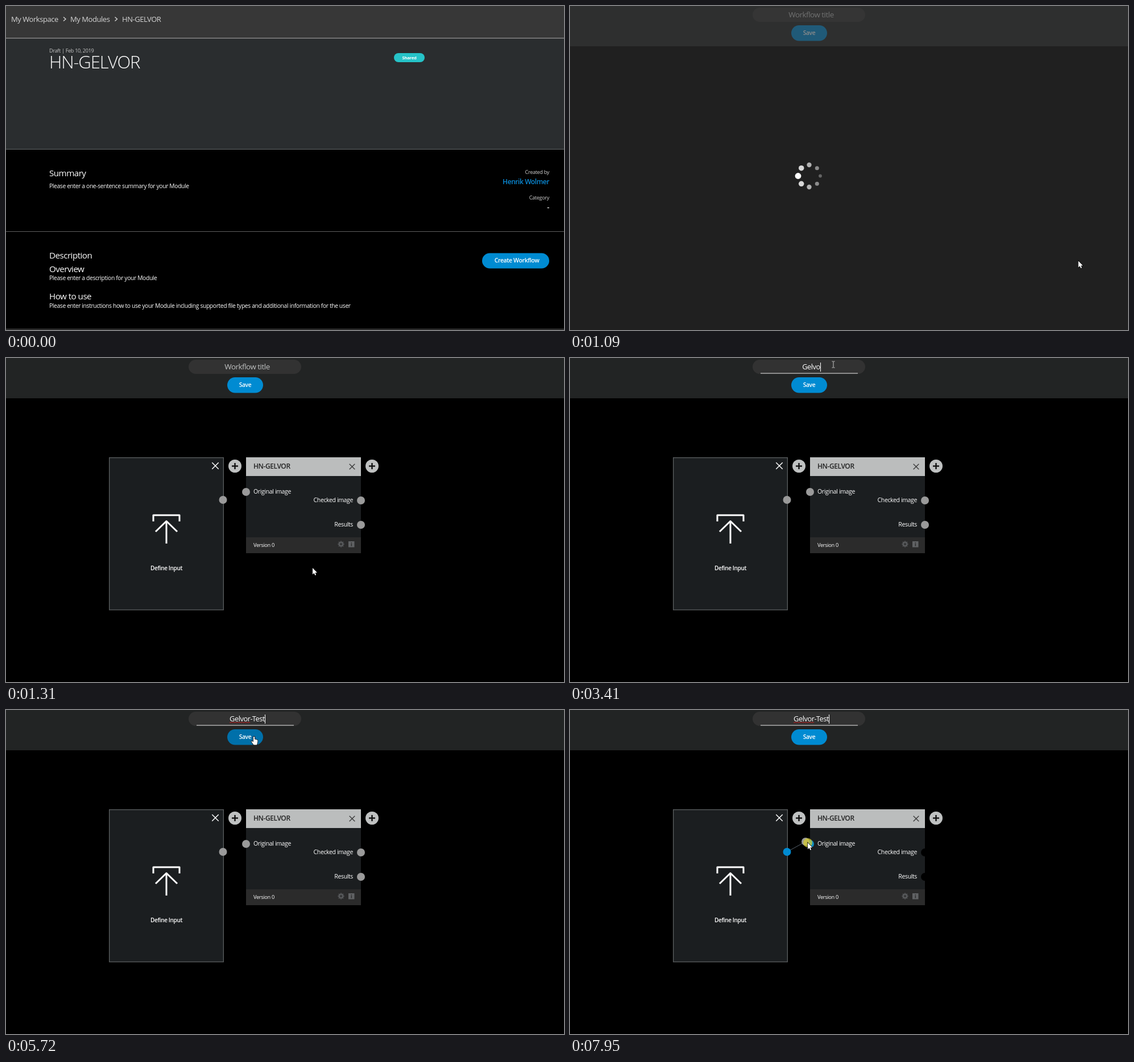
Recreate the animation shown at these times as an HTML page with a canvas. Size 981 by 571 pixels, loop 8 s.

```html
<!DOCTYPE html>
<html lang="en">
<head>
<meta charset="utf-8">
<title>Create workflow</title>
<style>
  html, body { margin: 0; width: 100%; height: 100%; overflow: hidden; background: #000; }
  canvas { display: block; width: 981px; height: 571px; }
</style>
</head>
<body>
<canvas id="stage" width="981" height="571"></canvas>
<script>
const ctx = document.getElementById('stage').getContext('2d');
const W = 981, H = 571, LOOP = 8000;
const MODULE = 'HN-GELVOR', TITLE = 'Gelvor-Test';
const BLUE = '#008bd2', BLUE_HOVER = '#0070aa', PANEL = '#1b1e20', DOT = '#9a9a9a';
const KEY_TIMES = [2730, 2950, 3070, 3290, 3410, 3630, 3850, 4070, 4290, 4510, 4630];
const DRAG_START = 6940, FIELD_X = 424;

// time, x, y of the pointer tip
const POINTER = [
  [100, 912, 552], [650, 903, 456], [870, 902, 451], [1090, 902, 451], [1310, 539, 370],
  [1420, 539, 370], [1520, 495, 170], [1630, 462, 14], [2080, 463, 11], [5080, 463, 11],
  [5600, 436, 47], [5850, 436, 47], [6400, 364, 262], [6700, 380, 250],
  [DRAG_START, 380, 250], [7930, 418, 234]
];
// start time and pointer shape
const POINTER_KINDS = [
  [100, arrow], [650, hand], [990, arrow], [1630, ibeam], [5290, arrow],
  [5400, hand], [5950, arrow], [6620, hand], [6830, arrow]
];

function rect(x, y, w, h, color) {
  ctx.fillStyle = color;
  ctx.fillRect(x, y, w, h);
}

function pill(x, y, w, h, color) {
  ctx.fillStyle = color;
  ctx.beginPath();
  ctx.roundRect(x, y, w, h, h / 2);
  ctx.fill();
}

function dot(x, y, r, color) {
  ctx.fillStyle = color;
  ctx.beginPath();
  ctx.arc(x, y, r, 0, Math.PI * 2);
  ctx.fill();
}

function trace(points) {
  ctx.beginPath();
  points.forEach(([x, y]) => ctx.lineTo(x, y));
}

function line(points, color, width) {
  trace(points);
  ctx.strokeStyle = color;
  ctx.lineWidth = width;
  ctx.stroke();
}

function setFont(size, weight = 400) {
  ctx.font = `${weight} ${size}px "Open Sans", "Noto Sans", sans-serif`;
  ctx.letterSpacing = `${-0.035 * size}px`;
}

function text(str, x, y, size, color = '#fff', weight = 400, align = 'left') {
  setFont(size, weight);
  ctx.textAlign = align;
  ctx.fillStyle = color;
  ctx.fillText(str, x, y);
}

function cross(x, y, r, color, width) {
  line([[x - r, y - r], [x + r, y + r]], color, width);
  line([[x - r, y + r], [x + r, y - r]], color, width);
}

function chevron(x, y) {
  line([[x, y - 3.5], [x + 4, y], [x, y + 3.5]], '#d4d4d4', 1.4);
}

function modulePage(hover) {
  rect(0, 0, W, H, '#000');
  rect(0, 0, W, 57, '#373737');
  rect(0, 58, W, 195, '#2a2d2f');
  rect(0, 56, W, 1.5, '#929292');
  rect(0, 252, W, 1, '#65686a');
  rect(0, 397, W, 1, '#606060');
  rect(0, 569, W, 1, '#606060');

  text('My Workspace', 9, 28, 13, '#d4d4d4');
  chevron(101, 23);
  text('My Modules', 113, 28, 13, '#d4d4d4');
  chevron(191.5, 23);
  text(MODULE, 204, 28, 13, '#d4d4d4');

  text('Draft | Feb 10, 2019', 76, 82, 9.1, '#c6c6c6');
  text(MODULE, 76, 110, 31, '#fff', 300);
  pill(682, 83, 54, 16, '#26c3c8');
  text('Shared', 709, 94, 7.7, '#fff', 700, 'center');

  text('Summary', 76, 300, 15.2);
  text('Please enter a one-sentence summary for your Module', 76, 321, 10.3);
  text('Created by', 955, 296, 9.1, '#d0d0d0', 400, 'right');
  text('Henrik Wolmer', 955, 314, 12, '#0a8ad6', 600, 'right');
  text('Category', 955, 341, 9.1, '#d0d0d0', 400, 'right');
  text('-', 955, 359, 13, '#fff', 600, 'right');

  text('Description', 76, 445, 15.2);
  text('Overview', 76, 469, 15.2);
  text('Please enter a description for your Module', 76, 483, 10.3);
  text('How to use', 76, 517, 15.2);
  text('Please enter instructions how to use your Module including supported file types ' +
    'and additional information for the user', 76, 532, 10.3);

  pill(837, 435.5, 118, 27, hover ? BLUE_HOVER : BLUE);
  text('Create Workflow', 898, 452, 10.5, '#fff', 600, 'center');
}

function titleField(t) {
  pill(321, 3, 198, 25, '#323232');
  const typed = TITLE.slice(0, KEY_TIMES.filter(k => t >= k).length);
  if (typed) text(typed, FIELD_X, 20, 12.8, '#fff', 400, 'center');
  else text('Workflow title', FIELD_X, 20, 13.4, '#c0c2c2', 400, 'center');
  if (t < 1630) return;

  const half = 85.5 * Math.min(1, 0.3 + (t - 1630) / 250);
  rect(420.5 - half, 26.5, half * 2, 1, '#e8e8e8');

  setFont(12.8);
  const width = ctx.measureText(typed).width;
  if (t >= 3850) {
    const left = FIELD_X - width / 2, wave = [];
    const length = ctx.measureText(TITLE.split('-')[0]).width;
    for (let x = 0; x <= length; x++) wave.push([left + x, 22 + 0.5 * Math.sin(x * 1.6)]);
    line(wave, '#d02020', 1);
  }
  const typing = t >= 2730 && t < 4640;
  const blinkStart = t < 2730 ? 1630 : 4640;
  if (typing || Math.floor((t - blinkStart) / 535) % 2 === 0) {
    rect(Math.round(FIELD_X + width / 2), 8, 1, 16, '#fff');
  }
}

function editorBase(t) {
  rect(0, 0, W, H, '#000');
  rect(0, 0, W, 71, '#222424');
  titleField(t);
  const hover = t >= 5510 && t < 5950;
  pill(389, 34, 63, 27.5, hover ? BLUE_HOVER : BLUE);
  text('Save', 420.5, 50.5, 10.3, '#fff', 600, 'center');
}

function loader(t) {
  editorBase(t);
  rect(0, 0, W, H, 'rgba(55,55,55,.58)');
  const turn = Math.floor((t - 1090) / 110);
  for (let i = 0; i < 8; i++) {
    const angle = Math.PI * (1 + (i + turn) / 4);
    const strength = 1 - Math.min(i, 8 - i) / 4;
    const shade = Math.round(100 + 155 * strength);
    dot(420.5 + 19.5 * Math.cos(angle), 299.5 + 19.5 * Math.sin(angle),
      2.9 + 2.5 * strength, `rgb(${shade},${shade},${shade})`);
  }
}

function plusButton(x, y) {
  dot(x, y, 11.5, '#bfc1c1');
  rect(x - 5.5, y - 1.2, 11, 2.4, '#111');
  rect(x - 1.2, y - 5.5, 2.4, 11, '#111');
}

function inputNode() {
  rect(181, 175, 202, 269.5, '#5b5e60');
  rect(182.3, 176.3, 199.4, 266.9, PANEL);
  cross(368, 190, 5.7, '#fff', 1.5);
  ctx.lineJoin = 'round';
  line([[259, 288], [259, 277], [305, 277], [305, 288]], '#fff', 3);
  line([[282, 327], [282, 288]], '#fff', 3);
  line([[263, 306], [282, 287.5], [301, 306]], '#fff', 3);
  ctx.lineJoin = 'miter';
  text('Define Input', 282, 373.5, 10, '#fff', 600, 'center');
}

function gear(x, y) {
  for (let i = 0; i < 8; i++) {
    const a = i * Math.PI / 4;
    line([[x, y], [x + 5.5 * Math.cos(a), y + 5.5 * Math.sin(a)]], '#555759', 2.2);
  }
  dot(x, y, 4.3, '#555759');
  dot(x, y, 1.7, '#2b2b2b');
}

function moduleNode() {
  rect(422, 175, 202, 33, '#bbbdbd');
  rect(422, 208, 202, 108, PANEL);
  rect(422, 316, 202, 28, '#2b2b2b');
  text(MODULE, 435, 195, 12, '#222', 600);
  cross(608.5, 191.5, 4.8, '#3c3c3c', 1.4);
  text('Original image', 435, 239, 10.5);
  text('Checked image', 610, 254, 10.5, '#fff', 400, 'right');
  text('Results', 610, 297, 10.5, '#fff', 400, 'right');
  text('Version 0', 435, 333, 9.2);
  gear(589, 328);
  rect(602, 323, 10.5, 10.5, '#606264');
  rect(606.6, 325, 1.5, 1.5, '#2b2b2b');
  rect(606.6, 327.3, 1.5, 4.2, '#2b2b2b');
}

function editor(t) {
  editorBase(t);
  inputNode();
  moduleNode();
  plusButton(402.5, 190.5);
  plusButton(643.5, 190.5);

  const dragging = t >= DRAG_START;
  dot(624, 251, 7, dragging ? '#000' : DOT);
  dot(624, 294, 7, dragging ? '#000' : DOT);
  dot(422, 236, 7, t >= 7730 ? '#0e8fc4' : DOT);
  if (dragging) {
    const [x, y] = pointerAt(t);
    line([[381.5, 250], [x - 4, y - 2]], '#55606a', 1);
    dot(x - 4, y - 2, 7, DOT);
    dot(x, y, 8, 'rgba(215,205,45,.72)');
  }
  dot(381.5, 250, 7, t >= 6730 ? BLUE : DOT);
}

function pointerAt(t) {
  const step = 110.56;
  const time = 100 + Math.floor((t - 90) / step) * step;
  const next = POINTER.findIndex(k => k[0] > time);
  if (next < 0) return POINTER[POINTER.length - 1].slice(1);
  if (next === 0) return POINTER[0].slice(1);
  const [t0, x0, y0] = POINTER[next - 1], [t1, x1, y1] = POINTER[next];
  const f = (time - t0) / (t1 - t0);
  return [x0 + (x1 - x0) * f, y0 + (y1 - y0) * f];
}

function outlined(points) {
  trace(points);
  ctx.closePath();
  ctx.strokeStyle = '#000';
  ctx.lineWidth = 1.4;
  ctx.stroke();
  ctx.fillStyle = '#fff';
  ctx.fill();
}

function arrow() {
  outlined([[0, 0], [0, 11.5], [2.6, 9.1], [4.4, 13], [6.2, 12.2], [4.5, 8.4], [8, 8.3]]);
}

function hand() {
  outlined([[-1, 0], [1, 0], [1.2, 4.5], [6, 5.8], [6.5, 7], [6, 11], [5, 14.5],
    [-0.5, 14.5], [-4.5, 9], [-4, 7.6], [-1.2, 9.2]]);
}

function ibeam() {
  rect(-0.5, -5, 1, 11, '#c8c8c8');
  for (const y of [-5.5, 5.5]) {
    rect(-2.5, y, 2, 1, '#c8c8c8');
    rect(0.5, y, 2, 1, '#c8c8c8');
  }
}

function pointer(t) {
  if (t < 100) return;
  const [x, y] = pointerAt(t);
  const [, shape] = POINTER_KINDS.filter(k => t >= k[0]).pop();
  ctx.save();
  ctx.translate(x, y);
  shape();
  ctx.restore();
}

function render(t) {
  if (t < 1090) modulePage(t >= 650);
  else if (t < 1310) loader(t);
  else editor(t);
  pointer(t);
}

const start = performance.now();
function tick() {
  render((performance.now() - start) % LOOP);
  requestAnimationFrame(tick);
}
tick();
</script>
</body>
</html>
```
